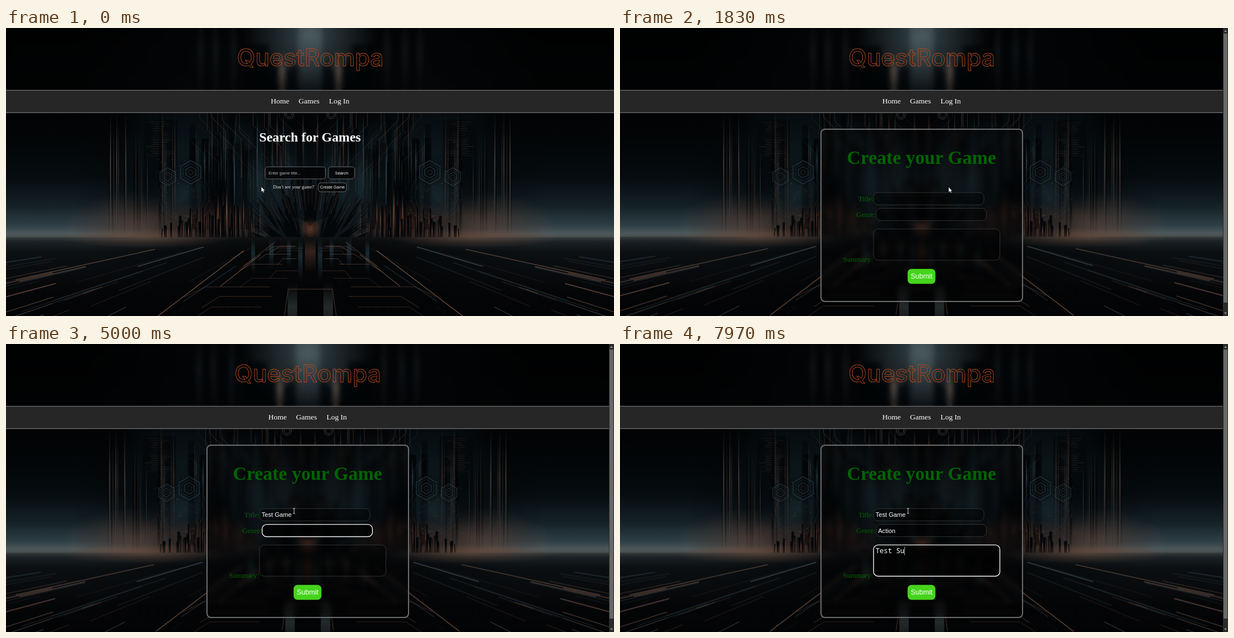
An HTML page with a canvas that plays this animation: 1086x515 px, repeating every 8 s.

```html
<!DOCTYPE html>
<html lang="en">
<head>
<meta charset="utf-8">
<title>Create a game</title>
<style>
  html, body { margin: 0; width: 100%; height: 100%; overflow: hidden; background: #000; }
  #stage { position: relative; width: 1086px; height: 515px; overflow: hidden; }
  #stage > * { position: absolute; }
  #bg { left: 0; top: -52px; transform-origin: 0 50%; }
  #head { left: 0; top: 0; width: 1086px; height: 111px; backdrop-filter: blur(5px); }
  #panel {
    left: 357.5px; top: 179.5px; width: 362px; height: 310px; box-sizing: border-box;
    border: 2.5px solid #6c6e70; border-radius: 8px;
    background: rgba(0, 0, 0, .25); backdrop-filter: blur(5px);
  }
  svg { left: 0; top: 0; }
  text { white-space: pre; fill: #fff; }
  .serif { font-family: 'Liberation Serif', serif; }
  .sans { font-family: 'Liberation Sans', sans-serif; }
  .mono { font-family: 'Noto Sans Mono', monospace; }
  .small { font-size: 7.35px; }
  .nav { font-size: 13.5px; }
  .brand { font: 500 42.5px Inter, sans-serif; fill: none; stroke: #b9491c; stroke-width: .9; }
  .green text { fill: #006400; }
  .label { font-size: 12.75px; }
  .value { font-size: 11.15px; }
  .menu text { font: 7px 'Open Sans', sans-serif; fill: #e4e4e4; }
  .btn { fill: rgba(0, 0, 0, .7); stroke: #66696b; }
  .btn.hover { fill: #222325; }
  .field { fill: rgba(0, 0, 0, .42); stroke: #3a3c3d; stroke-width: .8; }
  .field.focus { fill: rgba(0, 0, 0, .72); stroke: #f2f2f2; stroke-width: 1.4; }
</style>
</head>
<body>
<div id="stage">
  <canvas id="bg" width="1086" height="620"></canvas>
  <div id="head"></div>
  <div id="panel"></div>
  <svg width="1086" height="515" viewBox="0 0 1086 515">
    <path d="M0 111H1086V152H0z" fill="#262626"/>
    <path d="M0 111.3H1086M0 151.3H1086" stroke="#858585"/>
    <g id="top">
      <text class="brand" x="543.5" y="68" text-anchor="middle">QuestRompa</text>
      <g class="serif nav">
        <text x="473" y="135.3">Home</text>
        <text x="522.5" y="135.3">Games</text>
        <text x="577" y="135.3">Log In</text>
      </g>
    </g>

    <g id="search">
      <text class="serif" x="543" y="202.6" text-anchor="middle" font-size="23.8" font-weight="bold">Search for Games</text>
      <rect class="btn" x="463" y="248.3" width="107.6" height="21.6" rx="4.5"/>
      <rect class="btn" x="576" y="248.3" width="46.7" height="21.6" rx="4.5"/>
      <rect class="btn" id="create" x="558" y="276.9" width="50" height="16" rx="4"/>
      <g class="sans small">
        <text x="469" y="261.8" style="fill:#b4b4b4">Enter game title...</text>
        <text x="587.8" y="261.8">Search</text>
        <text x="561" y="287.4">Create Game</text>
      </g>
      <text class="serif" x="477" y="287.3" font-size="8.5" style="fill:#e8e8e8">Don't see your game?</text>
    </g>

    <g id="form">
      <g class="serif green">
        <text x="538.5" y="243.4" text-anchor="middle" font-size="33.7" font-weight="bold">Create your Game</text>
        <text class="label" x="425.8" y="309.5">Title:</text>
        <text class="label" x="422" y="337.7">Genre:</text>
        <text class="label" x="398.6" y="418.4">Summary:</text>
      </g>
      <rect class="field" x="453" y="294.3" width="197" height="21.9" rx="8"/>
      <rect class="field" x="457.5" y="322.6" width="197" height="21.9" rx="8"/>
      <rect class="field" x="452.9" y="359.4" width="225.6" height="55.8" rx="8"/>
      <text class="sans value" x="456.4" y="309.3"></text>
      <text class="sans value" x="460.9" y="337.6"></text>
      <text class="mono" font-size="12.25" x="456.4" y="374.4"></text>
      <rect id="caret" width=".8" fill="#e8e8e8"/>
      <rect x="513.7" y="430.8" width="49.7" height="26.8" rx="7" fill="#46d41c"/>
      <text class="sans" x="538.6" y="448.3" text-anchor="middle" font-size="12.5">Submit</text>
      <g id="menu" class="menu">
        <rect x="512.5" y="349.8" width="122" height="126.4" rx="2" fill="#1f1f1f"/>
      </g>
      <g id="scroll">
        <path d="M1077 0h9v515h-9z" fill="#2b2b2b"/>
        <path d="M1078 10h7v481h-7z" fill="#686868"/>
        <path d="M1079 7l2.5-3.5L1084 7zM1079 508.500l2.500 3.500 2.500-3.500z" fill="#8a8a8a"/>
      </g>
    </g>

    <path id="arrow" d="M0 0V9.300L2.200 7.300 3.700 10.400 5.200 9.700 3.800 6.700H6.500z" fill="#fff" stroke="#111" stroke-width=".5"/>
    <path id="beam" d="M-2-4.500H2M0-4.500V4.500M-2 4.500H2" fill="none" stroke="#d8d8d8" stroke-width=".9"/>
  </svg>
</div>
<script>
const $ = id => document.getElementById(id);
const LOOP = 8000, OPEN = 1830;

/* ---------- backdrop ---------- */
const c = $('bg').getContext('2d');
const MID = 543.5, VANISH = 335, HORIZON = 374;
let seed;
const rnd = () => (seed = (seed * 16807) % 2147483647) / 2147483647;
const range = (a, b) => a + rnd() * (b - a);
const warm = a => `rgba(172,126,102,${a})`;
const cool = a => `rgba(104,138,150,${a})`;
const either = a => (rnd() < .55 ? warm : cool)(a);

function fillGrad(g, stops, x, y, w, h) {
  stops.forEach(([p, color]) => g.addColorStop(p, color));
  c.fillStyle = g;
  c.fillRect(x, y, w, h);
}

function glow(x, y, r, squash, rgb, a) {
  c.save();
  c.translate(x, y);
  c.scale(1, squash);
  fillGrad(c.createRadialGradient(0, 0, 0, 0, 0, r),
    [[0, `rgba(${rgb},${a})`], [1, `rgba(${rgb},0)`]], -r, -r, 2 * r, 2 * r);
  c.restore();
}

function shape(color, ...p) {
  c.fillStyle = color;
  c.beginPath();
  for (let i = 0; i < p.length; i += 2) c.lineTo(p[i], p[i + 1]);
  c.fill();
}

function line(color, width, ...p) {
  c.strokeStyle = color;
  c.lineWidth = width;
  c.beginPath();
  for (let i = 0; i < p.length; i += 2) c.lineTo(p[i], p[i + 1]);
  c.stroke();
}

/* vertical streak that fades out at both ends */
function streak(x, y, w, h, rgb, a) {
  fillGrad(c.createLinearGradient(0, y, 0, y + h),
    [[0, `rgba(${rgb},0)`], [.4, `rgba(${rgb},${a})`], [1, `rgba(${rgb},0)`]], x, y, w, h);
}

function ring(x, y, r, sides, color, width = 1) {
  c.strokeStyle = color;
  c.lineWidth = width;
  c.beginPath();
  for (let i = 0; i < sides; i++) {
    const a = Math.PI * (2 * i / sides + .5);
    c.lineTo(x + r * Math.cos(a), y + r * Math.sin(a));
  }
  c.closePath();
  c.stroke();
}

function sky() {
  fillGrad(c.createLinearGradient(0, -52, 0, HORIZON), [
    [0, '#000'], [.55, '#020405'], [.75, '#060c0f'], [.87, '#142127'], [.95, '#2e3e45'], [.985, '#4c585b'], [1, '#4a4d4c']
  ], 0, -52, MID, 426);
  fillGrad(c.createLinearGradient(120, 0, 330, 0),
    [[0, 'rgba(3,5,7,0)'], [1, 'rgba(3,5,7,.8)']], 0, -52, MID, 426);
  glow(235, 352, 130, .45, '150,98,74', .38);
  glow(320, 225, 130, 1, '24,50,60', .38);
  glow(455, 270, 120, 1, '30,56,66', .5);

  glow(MID, 8, 120, 1, '96,122,130', .55);
  streak(522, -52, 22, 170, '120,140,146', .3);
  shape('rgba(1,4,6,.8)', 432, 120, 432, 30, 470, 30, 470, 62, 486, 62, 486, 120);
  shape('rgba(1,4,6,.7)', 500, 120, 500, 78, 522, 62, 522, 120);
  streak(488, 40, 10, 90, '150,124,108', .55);
  for (const x of [345, 372, 404]) streak(x, -20, 5, 150, '90,104,108', .3);
}

function towers() {
  for (let i = 0; i < 34; i++) {
    const x = range(325, 536), y = range(120, 230), w = range(4, 15);
    c.fillStyle = 'rgba(2,5,7,.5)';
    c.fillRect(x, y, w, 360 - y);
    streak(x + w, y, range(.8, 2.2), range(60, 150), rnd() < .5 ? '150,112,94' : '90,130,144', range(.15, .5));
  }
  fillGrad(c.createLinearGradient(0, 160, 0, 330),
    [[0, 'rgba(4,8,11,.9)'], [.6, 'rgba(4,8,11,.8)'], [1, 'rgba(4,8,11,0)']], 246, 164, 60, 170);
  for (let y = 168; y < 232; y += 4) line(warm(range(.08, .32)), .7, range(250, 266), y, range(276, 303), y);
  for (let i = 0; i < 18; i++) {
    const x = range(182, 312), y = range(120, 215), w = range(1, 5);
    streak(x, y, w, HORIZON - y, '2,4,6', .7);
    streak(x + w, y, range(.7, 1.6), HORIZON - y, rnd() < .6 ? '160,116,96' : '96,126,138', range(.15, .5));
  }
  for (const x of [186, 197, 213]) streak(x, 150, 1.4, 224, '150,130,116', .5);
  for (let i = 0; i < 13; i++) {
    const x = 532 - i * 14, y = range(156, 190), d = range(12, 34), end = range(225, 300);
    line(warm(range(.12, .36)), .9, x - d, 150, x - d, y, x, y + d, x, end);
    line(cool(range(.1, .28)), .8, x - 34, end - 55, x - 12, end - 33, x - 12, end);
  }
  ring(506, 154, 8, 40, cool(.5));
  ring(506, 154, 5, 40, warm(.4));
}

function machines() {
  for (const r of [38, 45]) ring(318, 298, r, 60, cool(.16), .8);
  glow(318, 298, 48, 1, '52,82,94', .3);
  for (let i = 0; i < 110; i++) {
    c.fillStyle = warm(range(.15, .6));
    c.fillRect(318 + range(-55, 55), 305 + range(-75, 40), 1, 1);
  }
  for (const [x, y, r] of [[330, 258, 21], [289, 266, 16]]) {
    glow(x, y, r * 1.3, 1, '3,8,11', .95);
    ring(x, y, r, 6, cool(.34), 1.2);
    ring(x, y, r * .75, 6, cool(.22));
    ring(x, y, r * .48, 6, cool(.4));
    ring(x, y, r * .22, 6, warm(.25));
  }
}

function city() {
  glow(375, 350, 90, .5, '140,84,62', .3);
  for (let i = 0; i < 62; i++) {
    const x = range(272, 455), rise = 1 - Math.abs(x - 395) / 150;
    const h = 8 + rise * range(15, 95), w = range(1.5, 5);
    c.fillStyle = '#04070a';
    c.fillRect(x, 380 - h, w, h);
    streak(x + w, 380 - h, range(.6, 1.3), h, '186,112,84', range(.15, .7));
  }
}

/* fan of dark blades around the centre */
function crown() {
  glow(485, 300, 80, 1, '40,66,76', .4);
  for (let i = 0; i < 64; i++) {
    const dx = range(2, 112), top = 250 + dx * .55 + range(-8, 70);
    const x = MID - dx, w = range(3, 8), base = MID - dx * .4;
    shape(i % 4 ? '#040709' : '#0d1418', x, top, x + w, top + w, base + w, 388, base - w, 388);
    line(either(range(.08, .34)), .8, x, top, x + (base - x) * .4, top + (388 - top) * .4);
  }
  for (let i = 0; i < 5; i++) line(warm(.4 - i * .06), 1, MID - 9 - i * 5, 346 - i * 2, MID, 358 + i * 5);
  glow(MID, 360, 20, 1, '190,102,72', .4);
}

function ground() {
  fillGrad(c.createLinearGradient(0, HORIZON, 0, 568), [
    [0, '#373d3f'], [.04, '#1c2225'], [.14, '#0c1013'], [.5, '#050608'], [1, '#010101']
  ], 0, HORIZON, MID, 200);
  fillGrad(c.createLinearGradient(150, 0, 420, 0),
    [[0, 'rgba(3,4,5,0)'], [1, 'rgba(3,4,5,.75)']], 0, HORIZON, MID, 200);
  glow(250, 376, 150, .12, '160,108,82', .34);
  for (const x of [438, 470, 502, 522]) streak(x, 376, range(6, 14), range(45, 85), '50,82,96', .45);
  streak(534, 376, 10, 60, '120,74,56', .4);

  for (let i = 0; i < 72; i++) {
    const dx = -range(170, 1600), near = Math.max(.26, .3 - dx / 6000 - .1);
    const a = range(near, 1), b = a + range(.06, .4);
    line(either(range(.1, .55)), range(.5, 1.7),
      MID + dx * a, VANISH + 180 * a, MID + dx * b, VANISH + 180 * b);
  }
  for (let k = 0; k < 12; k++) {
    const y = 390 + k * k * .9, d = y - VANISH, a = range(.15, .6), b = a + range(.3, .9);
    line(warm(range(.15, .42)), .9, MID - d * a, y, MID - d * b, y, MID - d * b * 1.2, y + d * .14);
  }
  line(warm(.6), 1.5, 425, 398, 270, 516);
  line(warm(.4), 1, MID, 467, 504, 467, 497, 515);
  streak(503, 455, 17, 110, '84,96,100', .4);
}

function half() {
  seed = 4217;
  c.save();
  c.beginPath();
  c.rect(0, -52, MID + .5, 620);
  c.clip();
  [sky, towers, machines, city, crown, ground].forEach(draw => draw());
  c.restore();
}

c.translate(0, 52);
half();
c.translate(2 * MID, 0);
c.scale(-1, 1);
half();

/* ---------- form ---------- */
['Action', 'Action, Adventure', 'Action, Adventure, Gore', 'Action, Adventure, Violence',
  'Action, Competative', 'Action, Crime, Violence'].forEach((label, i) => {
  const item = document.createElementNS('http://www.w3.org/2000/svg', 'text');
  item.setAttribute('x', 519);
  item.setAttribute('y', 365.2 + i * 20.32);
  item.textContent = label;
  $('menu').append(item);
});

const boxes = document.querySelectorAll('.field');
const values = document.querySelectorAll('#form > .value, #form > .mono');
const fields = [
  { text: 'Test Game', keys: [3230, 3430, 3490, 3540, 3600, 3870, 4070, 4170, 4270], from: 2430, to: 4470, dim: 2970, y: 298.5, h: 13 },
  { text: 'Action', keys: [5430, 5700, 5870, 5930, 5980, 6030], from: 4470, to: 6170, dim: 5000, y: 327, h: 13 },
  { text: 'Test Su', keys: [7000, 7300, 7400, 7500, 7630, 7830, 7970], from: 6170, to: LOOP, dim: 6670, y: 362.5, h: 15 }
];

/* time, x, y of the pointer */
const path = [
  [100, 456, 284], [300, 466, 303], [480, 494, 315], [680, 531, 314], [900, 561.500, 304],
  [1080, 585, 298], [1250, 614, 290], [1430, 588, 285.500], [1770, 587, 284.500],
  [1930, 587, 284.500], [2180, 547, 294], [2430, 514.500, 298], [2570, 514.500, 298.500]
];

function pointer(t) {
  const i = path.findIndex(p => p[0] > t);
  if (i === 0) return path[0].slice(1);
  if (i < 0) return path[path.length - 1].slice(1);
  const [t0, x0, y0] = path[i - 1], [t1, x1, y1] = path[i];
  const k = (t - t0) / (t1 - t0);
  return [x0 + (x1 - x0) * k, y0 + (y1 - y0) * k];
}

const show = (el, on) => { el.style.display = on ? '' : 'none'; };
const inside = (x, y, l, t, r, b) => x > l && x < r && y > t && y < b;

function render(t) {
  const form = t >= OPEN, [x, y] = pointer(t);
  $('bg').style.transform = form ? `scale(${1077 / 1086})` : '';
  $('top').setAttribute('transform', form ? 'translate(-4.5 0)' : '');
  show($('search'), !form);
  show($('form'), form);
  show($('panel'), form);

  const beam = form && inside(x, y, 453, 294, 650, 316);
  show($('arrow'), !beam);
  show($('beam'), beam);
  $(beam ? 'beam' : 'arrow').setAttribute('transform', `translate(${x} ${y})`);
  $('create').classList.toggle('hover', inside(x, y, 558, 277, 608, 293));

  let caret = false;
  fields.forEach((f, i) => {
    const n = f.keys.filter(k => k <= t).length, focus = t >= f.from && t < f.to;
    const str = f.text.slice(0, n);
    if (values[i].textContent !== str) values[i].textContent = str;
    boxes[i].classList.toggle('focus', focus);
    if (focus && (n || t < f.dim)) {
      caret = true;
      const w = n ? values[i].getComputedTextLength() : 0;
      $('caret').setAttribute('x', +values[i].getAttribute('x') + w);
      $('caret').setAttribute('y', f.y);
      $('caret').setAttribute('height', f.h);
    }
  });
  show($('caret'), caret);

  const leave = Math.min(1, Math.max(0, (t - 6170) / 160));
  show($('menu'), t >= 5470 && leave < 1);
  $('menu').setAttribute('opacity', 1 - leave);
  $('menu').setAttribute('transform', `translate(0 ${30 * leave})`);
}

const start = performance.now();
function tick() {
  render((performance.now() - start) % LOOP);
  requestAnimationFrame(tick);
}
tick();
</script>
</body>
</html>
```
